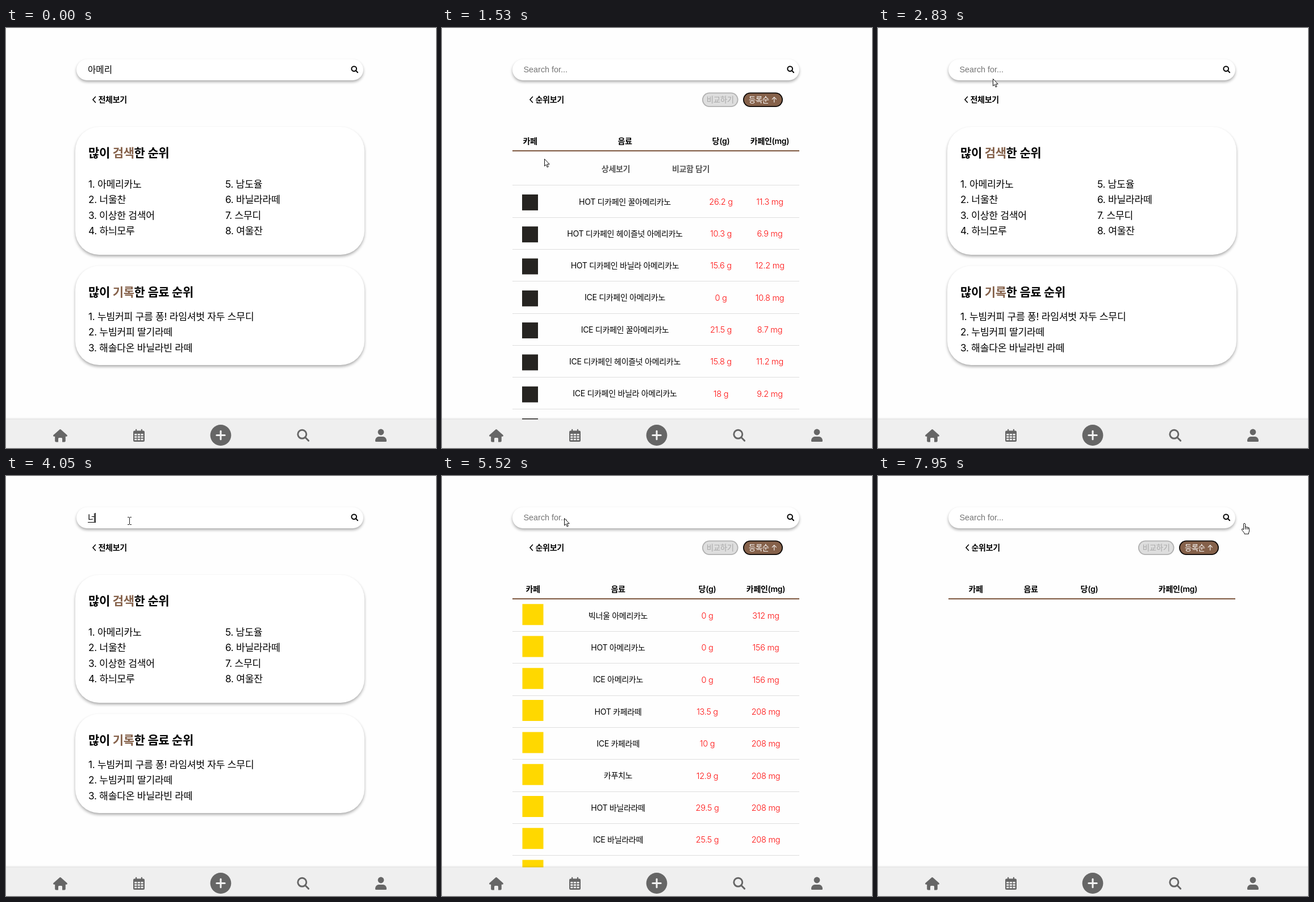
An HTML page with a canvas for the animation above (8000 ms loop, 757 by 739 pixels).

```html
<!DOCTYPE html>
<html lang="ko">
<head>
<meta charset="utf-8">
<title>음료 검색</title>
<style>
html, body { margin: 0; width: 100%; height: 100%; overflow: hidden; background: #fefefe; }
canvas { display: block; }
</style>
</head>
<body>
<canvas id="stage" width="757" height="739"></canvas>
<script>
const ctx = document.getElementById('stage').getContext('2d');
const LOOP = 8000, STEP = 70;
const BROWN = '#85614a', GRAY = '#666', RED = '#ff0d0d';
const SANS = 'Inter, "Noto Sans CJK KR", "Noto Sans CJK", sans-serif';
const INPUT = '"Liberation Sans", "Noto Sans CJK KR", "Noto Sans CJK", sans-serif';

// Draws text vertically centred on cy and returns its width.
function text(str, x, cy, size, { color = '#000', weight = 400, align = 'left', family = SANS, gap = -0.3 } = {}) {
  ctx.font = `${weight} ${size}px ${family}`;
  ctx.letterSpacing = gap + 'px';
  ctx.textAlign = align;
  ctx.fillStyle = color;
  ctx.fillText(str, x, cy + size * 0.36);
  return ctx.measureText(str).width;
}

function runs(parts, x, cy, size) {
  for (const [str, color] of parts) x += text(str, x, cy, size, { color, weight: 600, gap: -0.4 });
}

function box(x, y, w, h, r, fill) {
  ctx.beginPath();
  ctx.roundRect(x, y, w, h, r);
  ctx.fillStyle = fill;
  ctx.fill();
}

function line(points, width, color, cap = 'butt') {
  ctx.beginPath();
  points.forEach(([x, y], i) => i ? ctx.lineTo(x, y) : ctx.moveTo(x, y));
  ctx.lineWidth = width;
  ctx.strokeStyle = color;
  ctx.lineCap = cap;
  ctx.stroke();
}

function disc(x, y, r, fill) {
  ctx.beginPath();
  ctx.arc(x, y, r, 0, 7);
  ctx.fillStyle = fill;
  ctx.fill();
}

function raised(x, y, w, h, r, fill = '#fff') {
  ctx.save();
  ctx.shadowColor = 'rgba(0,0,0,.32)';
  ctx.shadowBlur = 5;
  ctx.shadowOffsetY = 3;
  box(x, y, w, h, r, fill);
  ctx.restore();
}

function lens(x, y, r, tail, width, color) {
  ctx.beginPath();
  ctx.arc(x, y, r, 0, 7);
  ctx.lineWidth = width;
  ctx.strokeStyle = color;
  ctx.stroke();
  const d = r * 0.72;
  line([[x + d, y + d], [x + tail, y + tail]], width, color, 'round');
}

function backLink(label, x) {
  line([[x + 5.5, 121], [x + 1, 126], [x + 5.5, 131]], 1.6, '#000', 'round');
  text(label, x + 10.5, 126, 14, { weight: 600 });
}

// ---- search field ----
const TYPED = [[4050, '너'], [4120, '넝'], [4380, '너우'], [4450, '너울'], [4710, '너울차'], [4780, '너울찬']];

function searchField(t) {
  raised(124, 55, 505, 37, 18.5);
  lens(612.7, 71.8, 4.3, 6.4, 2, '#000');
  let word = t < 1040 ? '아메리' : '';
  if (t >= 4050 && t < 5520) word = TYPED.filter(k => k[0] <= t).pop()[1];
  let w = 0;
  if (word) w = text(word, 144, 73, 15.6, { weight: 300, family: INPUT, gap: 0 });
  else text('Search for...', 143.5, 72.5, 14.4, { color: '#757575', family: INPUT, gap: 0 });

  const typing = t >= 4050 && t < 5520;
  if (typing && t < 5310) {
    const cell = w / word.length;
    ctx.fillStyle = '#000';
    ctx.fillRect(Math.round(143.5 + w - cell), 81, Math.round(cell), 1);
  }
  if (typing || (t >= 3170 && t < 3700)) {
    ctx.fillStyle = '#000';
    ctx.fillRect(Math.round(143 + w), 65, 1, 16);
  }
}

// ---- ranking page ----
const SEARCHED = ['아메리카노', '너울찬', '이상한 검색어', '하늬모루', '남도율', '바닐라라떼', '스무디', '여울잔'];
const LOGGED = ['누빔커피 구름 퐁! 라임셔벗 자두 스무디', '누빔커피 딸기라떼', '해솔다온 바닐라빈 라떼'];

function ranking() {
  backLink('전체보기', 152);
  raised(122, 174, 509, 225, 42);
  raised(122, 418.5, 509, 174.5, 42);
  runs([['많이 ', '#000'], ['검색', BROWN], ['한 순위', '#000']], 145, 219.5, 21);
  runs([['많이 ', '#000'], ['기록', BROWN], ['한 음료 순위', '#000']], 145, 464, 21);
  SEARCHED.forEach((s, i) => text(`${i + 1}. ${s}`, i < 4 ? 145 : 386, 274.5 + (i % 4) * 27.5, 17.2));
  LOGGED.forEach((s, i) => text(`${i + 1}. ${s}`, 145, 507.5 + i * 27.7, 17.2));
}

// ---- drink tables ----
const decaf = (kind, name) => `${kind} 디카페인 ${name}아메리카노`;
const MENU_A = {
  cols: [155, 322, 491, 577],
  logo: (x, y) => box(x - 14, y + 16, 28, 28, 0, '#262421'),
  rows: [
    [decaf('HOT', ''), 0, 11.4], [decaf('HOT', '꿀'), 26.2, 11.3],
    [decaf('HOT', '헤이즐넛 '), 10.3, 6.9], [decaf('HOT', '바닐라 '), 15.6, 12.2],
    [decaf('ICE', ''), 0, 10.8], [decaf('ICE', '꿀'), 21.5, 8.7],
    [decaf('ICE', '헤이즐넛 '), 15.8, 11.2], [decaf('ICE', '바닐라 '), 18, 9.2], ['', 0, 0]
  ]
};
const MENU_B = {
  cols: [160, 310, 467, 570],
  logo: (x, y) => box(x - 18.5, y + 8, 37, 37, 0, '#ffd800'),
  rows: [
    ['빅너울 아메리카노', 0, 312], ['HOT 아메리카노', 0, 156], ['ICE 아메리카노', 0, 156],
    ['HOT 카페라떼', 13.5, 208], ['ICE 카페라떼', 10, 208], ['카푸치노', 12.9, 208],
    ['HOT 바닐라라떼', 29.5, 208], ['ICE 바닐라라떼', 25.5, 208], ['', 0, 0]
  ]
};
const EMPTY = { cols: [172, 269, 372, 528], rows: [] };
const HOVERS = [[1040, 1320, 1], [1320, 1600, 0]];

function pill(label, x, w, fill, edge, ink) {
  box(x, 113.5, w, 25.5, 12.7, edge);
  box(x + 1.8, 115.3, w - 3.6, 21.9, 11, fill);
  text(label, x + w / 2, 126, 13.33, { color: ink, align: 'center' });
}

function table(menu, t) {
  backLink('순위보기', 154);
  pill('비교하기', 458, 63.5, '#dedede', '#b0b0b0', '#a8a8a8');
  pill('등록순 ↑', 530, 70, BROWN, '#0c0806', '#fff');
  ['카페', '음료', '당(g)', '카페인(mg)'].forEach((s, i) =>
    text(s, menu.cols[i], 198.5, 14, { weight: 600, align: 'center' }));
  ctx.fillStyle = BROWN;
  ctx.fillRect(124, 215, 505, 2.2);

  const hover = HOVERS.find(h => t >= h[0] && t < h[1]);
  const [logoX, nameX, sugarX, cafX] = menu.cols;
  let y = 217.2;
  menu.rows.forEach(([name, sugar, caf], i) => {
    const open = hover && hover[2] === i;
    const h = open ? 59.7 : 56.3;
    const cy = y + h / 2 + 0.5;
    if (open) {
      ctx.globalAlpha = Math.min(1, 0.06 + (t - hover[0]) / 350);
      text('상세보기', 306, cy, 14, { weight: 600, align: 'center' });
      text('비교함 담기', 438, cy, 14, { weight: 600, align: 'center' });
      ctx.globalAlpha = 1;
    } else {
      menu.logo(logoX, y);
      if (name) {
        const red = { color: RED, weight: 300, align: 'center' };
        text(name, nameX, cy, 14, { align: 'center' });
        text(sugar + ' g', sugarX, cy, 14.6, red);
        text(caf + ' mg', cafX, cy, 14.6, red);
      }
    }
    y += h;
    ctx.fillStyle = '#dedede';
    ctx.fillRect(124, Math.round(y - 0.5), 505, 1);
  });
}

// ---- bottom bar ----
const HOME = new Path2D('M94.4 706.5Q95.5 705.5 96.6 706.5L107.6 716.3Q108.6 718.6 106.5 718.8H104.8V726.5Q104.8 728.5 102.8 728.5H99V722.5Q99 721 97.5 721H93.5Q92 721 92 722.5V728.5H88.2Q86.2 728.5 86.2 726.5V718.8H84.5Q82.4 718.6 83.4 716.3Z');
const BODY = new Path2D('M650 726.5C650 721.5 653 719 657 719H663C667 719 670 721.5 670 726.5Q670 728 668.5 728H651.5Q650 728 650 726.5Z');

function navBar() {
  ctx.save();
  ctx.shadowColor = 'rgba(0,0,0,.3)';
  ctx.shadowBlur = 4;
  box(-10, 688.5, 777, 70, 0, '#efefef');
  ctx.restore();

  ctx.fillStyle = GRAY;
  ctx.fill(HOME);

  box(224, 708.5, 20, 19.5, 2.5, GRAY);
  box(228, 705.8, 2.2, 5, 1, GRAY);
  box(237.8, 705.8, 2.2, 5, 1, GRAY);
  for (let i = 0; i < 9; i++) box(226.2 + (i % 3) * 5.6, 714 + Math.floor(i / 3) * 4.3, 4.2, 2.7, 0, '#efefef');

  disc(378, 716.5, 18.4, GRAY);
  line([[370.8, 716.5], [385.2, 716.5]], 3, '#f2f2f2', 'round');
  line([[378, 709.3], [378, 723.7]], 3, '#f2f2f2', 'round');

  lens(521.3, 714.8, 7.5, 11.3, 2.9, GRAY);
  disc(660, 711, 5.4, GRAY);
  ctx.fillStyle = GRAY;
  ctx.fill(BODY);
}

// ---- pointer ----
const SHAPES = {
  arrow: new Path2D('M.5 .5V13L3.3 10.4L5.2 15L7.2 14.1L5.3 9.7H9.2Z'),
  hand: new Path2D('M-1.5 1.8Q-1.5 .3 0 .3Q1.5 .3 1.5 1.8V7Q3 5.6 4.2 7.2Q5.8 6.2 6.7 8Q8.7 7.4 8.7 9.5V13Q8.7 15 7.5 17V19H0V17.5L-4.3 12Q-5 9.6 -3.2 9.8L-1.5 11.5ZM1.5 7V11M4.2 7.4V11M6.7 8V11')
};
// start, shape, from x, y, to x, y, duration
const TRACK = [
  [130, 'arrow', 610, 643, 190, 282, 700],
  [840, 'arrow', 194, 276],
  [1320, 'arrow', 194, 276, 158, 158, 490],
  [1880, 'arrow', 157, 152, 168, 137, 140],
  [2090, 'hand', 174, 130, 178, 127, 60],
  [2490, 'arrow', 180, 125, 204, 86, 340],
  [3030, 'beam', 209, 92, 217, 79, 280],
  [5380, 'arrow', 215, 78],
  [5520, 'arrow', 215, 74],
  [6180, 'beam', 225, 83],
  [6510, 'beam', 240, 84, 553, 87, 210],
  [6920, 'beam', 594, 85],
  [6990, 'beam', 600, 86, 606, 87, 140],
  [7200, 'hand', 611, 85, 614, 84, 270],
  [7670, 'hand', 615, 78, 645, 83, 280]
];

function pointer(t) {
  const key = TRACK.filter(k => k[0] <= t).pop();
  if (!key) return;
  const [start, shape, x0, y0, x1 = x0, y1 = y0, span = 1] = key;
  const k = Math.min(1, Math.floor((t - start) / STEP) * STEP / span);
  const e = k * k * (3 - 2 * k);
  const x = Math.round(x0 + (x1 - x0) * e), y = Math.round(y0 + (y1 - y0) * e);

  if (t >= 2420 && t < 2490) {
    ctx.globalCompositeOperation = 'multiply';
    disc(x, y, 12, '#fff04a');
    ctx.globalCompositeOperation = 'source-over';
  }
  ctx.save();
  ctx.translate(x, y);
  if (shape === 'beam') {
    ctx.fillStyle = '#222';
    ctx.fillRect(0, -6, 1, 12);
    for (const dy of [-7, 6]) {
      ctx.fillRect(-3, dy, 3, 1);
      ctx.fillRect(1, dy, 3, 1);
    }
  } else {
    ctx.fillStyle = '#fff';
    ctx.fill(SHAPES[shape]);
    ctx.lineWidth = 1;
    ctx.lineCap = 'butt';
    ctx.strokeStyle = '#111';
    ctx.stroke(SHAPES[shape]);
  }
  ctx.restore();
}

function draw(t) {
  ctx.fillStyle = '#fefefe';
  ctx.fillRect(0, 0, 757, 739);
  searchField(t);
  if (t < 1040) ranking();
  else if (t < 2490) table(MENU_A, t);
  else if (t < 5520) ranking();
  else table(t < 7880 ? MENU_B : EMPTY, t);
  navBar();
  pointer(t);
}

function tick(now) {
  draw(now % LOOP);
  requestAnimationFrame(tick);
}
draw(0);
requestAnimationFrame(tick);
</script>
</body>
</html>
```
